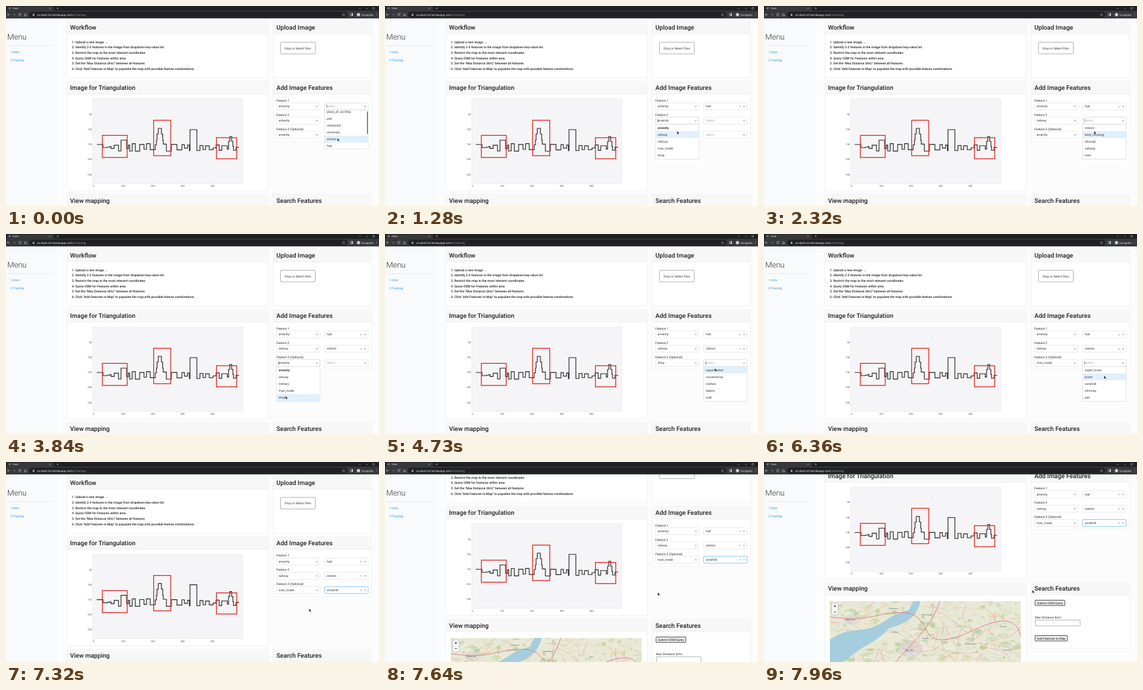
Animation, 600 px wide and 322 px high, one loop 8 s. Source, as an HTML page:

```html
<!DOCTYPE html>
<html lang="en">
<head>
<meta charset="utf-8">
<title>Dash</title>
<style>
  html, body { margin: 0; width: 100%; height: 100%; overflow: hidden; background: #fcfcfc; }
  svg { display: block; width: 100vw; height: 100vh; }
  text { font-family: Roboto, sans-serif; text-rendering: geometricPrecision; white-space: pre; }
</style>
</head>
<body>
<svg viewBox="0 0 600 322" xmlns="http://www.w3.org/2000/svg">
  <rect width="600" height="322" fill="#fcfcfc"/>
  <g id="page"><g id="cards"></g><g id="form"></g></g>
  <g id="frame"></g>
  <path id="cursor" d="M0 0V5.2L1.2 4.1L2.1 6L3 5.6L2.2 3.8H3.8Z" fill="#111" stroke="#fff" stroke-width=".4"/>
</svg>
<script>
const LOOP = 8000, ROW_H = 11.15;
const el = id => document.getElementById(id);

// y is the vertical middle of the line of text
const text = (x, y, s, size = 5, fill = '#2b2b2b', more = '') =>
  `<text x="${x}" y="${y + size * 0.355}" font-size="${size}" fill="${fill}" ${more}>${s}</text>`;
const rect = (x, y, w, h, fill, more = '') =>
  `<rect x="${x}" y="${y}" width="${w}" height="${h}" fill="${fill}" ${more}/>`;
const line = (d, color, width = 0.6) => `<path d="${d}" fill="none" stroke="${color}" stroke-width="${width}"/>`;
const edge = (color, width = 0.5, r = 0) => `stroke="${color}" stroke-width="${width}" rx="${r}"`;
const repeat = (n, draw) => Array.from({ length: n }, (_, i) => draw(i)).join('');

function randomizer(seed) {
  return (a, b) => a + (b - a) * ((seed = seed * 16807 % 2147483647) / 2147483647);
}

function card(x, y, w, h, title) {
  return rect(x, y, w, h, '#fff', edge('#e3e3e3', 0.5, 1)) +
    rect(x, y, w, 20, '#f7f7f7') + line(`M${x} ${y + 20}h${w}`, '#e0e0e0', 0.5) +
    text(x + 5, y + 9.7, title, 10.05, '#212121', 'font-weight="500"');
}

// ---- chart ----
// A rough ground line with a few buildings: [middle, half width, top]
function skyline() {
  const rnd = randomizer(5);
  const buildings = [[189, 4, 216], [247, 5, 216], [247, 4, 206], [247, 2, 197], [301, 5, 199], [361, 3, 218], [361, 1, 210]];
  let d = 'M146 223', ground = 223, stepEnd = 155;
  for (let x = 146; x <= 375; x++) {
    if (x > stepEnd) {
      ground = ground > 227 ? rnd(221, 229) : rnd(228, 234);
      stepEnd = x + rnd(1, 9);
    }
    const tops = buildings.filter(([mid, half]) => Math.abs(x - mid) <= half).map(b => b[2]);
    d += `H${x}V${Math.min(ground, ...tops)}`;
  }
  return line(d, '#222', 1.15);
}

function chart() {
  const box = (x, y, w, h) => rect(x, y, w, h, 'none', edge('#e3201f', 1.3));
  const label = (x, y, s, anchor) =>
    text(x, y, s, 4, '#555', `text-anchor="${anchor}" font-family="Open Sans, sans-serif"`);
  return rect(139.5, 149.5, 241.5, 136.5, '#f5f5f7', edge('#e2e3e8')) +
    repeat(5, i => label(138, 174.5 + i * 24.15, 50 + i * 50, 'end')) +
    repeat(5, i => label(140.5 + i * 47.9, 289.5, i * 100, 'middle')) +
    skyline() + box(155, 208.3, 40, 35.5) + box(237.5, 184, 27.5, 57) + box(338.5, 212, 32.7, 34);
}

// ---- map ----
function map() {
  const X = 106, Y = 333.5, W = 307, H = 140;
  const rnd = randomizer(11), rndX = () => rnd(X, X + W), rndY = () => rnd(Y, Y + H);
  const blob = (x, y, rx, ry, fill) =>
    `<ellipse cx="${x}" cy="${y}" rx="${rx}" ry="${ry}" fill="${fill}" opacity=".7"/>`;
  const road = (color, width, reach) => {
    const angle = rnd(0, 6.28), dx = Math.cos(angle) * reach, dy = Math.sin(angle) * reach;
    const bend = rnd(-0.2, 0.2);
    return line(`M${rndX()} ${rndY()}q${dx / 2 - dy * bend} ${dy / 2 + dx * bend} ${dx} ${dy}`, color, width);
  };
  const name = (x, y, s, size) => text(x, y, s, size, '#444',
    'text-anchor="middle" stroke="#fff" stroke-width=".7" stroke-opacity=".6" paint-order="stroke"');
  const greens = ['#c6d9a8', '#dbe4c4', '#b5cf9b', '#e0dccb'], roads = ['#e0a58a', '#dc8f98', '#e8c987'];
  const towns = ['Chepstow', 'Portishead', 'Yate', 'Stroud', 'Tetbury', 'Dursley', 'Chippenham', 'Thornbury'];
  const land = rect(X, Y, W, H, '#e8e8d6') +
    repeat(320, i => blob(rndX(), rndY(), rnd(1, 8), rnd(1, 4), greens[i % 4])) +
    blob(141, 363, 13, 8, '#d9d0ce') + blob(236, 410, 19, 14, '#d9d0ce');
  const water = `<path d="M240 333H252Q249 350 236 361T201 377Q190 392 154 411L128 431L106 450V396
    Q125 381 150 380T195 365T233 348Z" fill="#a6cddd"/>`;
  const minorRoads = repeat(190, () => road('#fafaf2', 0.4, rnd(8, 40))) +
    repeat(210, i => road(roads[i % 3], 0.5, rnd(8, 45)));
  const motorways = line('M106 359Q150 365 176 358T226 352T262 382T340 379T413 391', '#dd7f91', 1) +
    line('M283 333Q275 360 256 382T222 420T180 462', '#dd7f91', 1);
  return `<clipPath id="mapBox">${rect(X, Y, W, H, '#000')}</clipPath><g clip-path="url(#mapBox)">` +
    land + minorRoads + water + motorways +
    towns.map((s, i) => name(X + 100 + i % 4 * 60 + rnd(-15, 15), Y + 12 + i * 9.5, s, 3.4)).join('') +
    name(139, 363, 'Newport', 4.4) + name(234, 413, 'Bristol', 4.8) + '</g>' +
    rect(109, 337, 10, 18.5, '#fff', edge('#aaa', 0.6, 1.2)) + line('M109 346.2h10', '#ccc', 0.4) +
    line('M112.2 341.6h3.6M114 339.8v3.6M112.2 350.8h3.6', '#111', 0.8);
}

function button(x, y, w, label) {
  return rect(x, y, w, 8.6, '#efefef', edge('#222', 0.8, 0.6)) +
    text(x + w / 2, y + 4.3, label, 5, '#111', 'text-anchor="middle"');
}

const steps = ['Upload a new image →', 'Identify 2-3 features in the image from dropdown key-value list',
  'Restrict the map to the most relevant coordinates', 'Query OSM for Features within area',
  'Set the "Max Distance (Km)" between all features',
  'Click "Add Features to Map" to populate the map with possible feature combinations'];

el('cards').innerHTML =
  card(98, 25, 324, 90.5, 'Workflow') +
  steps.map((s, i) => text(106, 57.8 + i * 8.65, `${i + 1}. ${s}`, 5.1, '#1c1c1c', 'font-weight="500"')).join('') +
  card(430, 25, 158, 90.5, 'Upload Image') +
  rect(441.5, 58.3, 56, 18.7, '#fff', edge('#777', 0.6, 1.6)) +
  text(469.5, 67.8, 'Drop or Select Files', 4.95, '#333', 'text-anchor="middle"') +
  card(98, 122, 324, 175, 'Image for Triangulation') + chart() +
  card(430, 122, 158, 96, 'Add Image Features') +
  card(98, 303.5, 324, 180, 'View mapping') + map() +
  card(430, 303.5, 158, 106, 'Search Features') +
  button(436, 332, 48, 'Submit OSM Query') +
  text(436, 359.5, 'Max Distance (km)', 5) +
  rect(436.3, 364, 72, 9.4, '#fff', edge('#888', 0.6)) +
  button(436, 389, 52, 'Add Features to Map');

// ---- browser bars and side menu, which do not scroll ----
el('frame').innerHTML =
  rect(0, 20, 84, 302, '#f9fafb') +
  text(2, 49.5, 'Menu', 12.6, '#333', 'font-weight="300"') + line('M2 64h73', '#d5d5d5', 0.5) +
  text(7, 74.3, '1-Intro', 5, '#2196f3') + text(7, 87.2, '2-Training', 5, '#2196f3') +
  rect(0, 0, 600, 8, '#1f2023') + rect(2, 0.8, 75, 8, '#37383c', 'rx="2"') + rect(0, 7.5, 600, 12.5, '#37383c') +
  '<circle cx="6" cy="3.7" r="1.4" fill="#8a8fa0"/>' + text(11, 3.7, 'Dash', 4, '#e6e6e6') +
  line('M69.5 2.6l2.2 2.2m0-2.2l-2.2 2.2M81.5 3.7h3.4M83.2 2v3.4', '#ccc', 0.5) +
  line('M567.5 3l1.5 1.5L570.5 3M579 4h3M590 2.4h2.6v2.6h-2.6z', '#ccc', 0.5) +
  rect(37, 9.2, 512, 9.4, '#202124', 'rx="4.7"') +
  line('M5.8 13.9H2.4M4 12.2L2.3 13.9L4 15.6', '#ddd') +
  line('M11.5 13.9h3.4M13.3 12.2l1.7 1.7l-1.7 1.7', '#86878a') +
  line('M24 13a1.9 1.9 0 1 0 .1 1.6M24.3 11.8v1.4h-1.4M29.2 14l2.1-2l2.1 2M29.8 13.6v2.2h3v-2.2', '#ddd') +
  rect(43, 13.4, 2.6, 2.2, '#ccc') + line('M43.6 13.4v-.7a.7.7 0 0 1 1.4 0v.7', '#ccc', 0.4) +
  text(50, 13.9, 'os-dash-int.herokuapp.com<tspan fill="#9a9b9e">/2-training</tspan>', 4.7, '#eee') +
  line('M543 11.9l.7 1.4 1.5.2-1.1 1 .3 1.5-1.4-.7-1.4.7.3-1.5-1.1-1 1.5-.2z', '#ccc', 0.4) +
  rect(554, 12, 3.8, 3.8, 'none', edge('#ddd')) + rect(556, 12, 1.8, 3.8, '#ddd') +
  '<circle cx="567" cy="13.9" r="2.6" fill="#cfd0d3"/>' + text(572, 13.9, 'Incognito', 4.6, '#e8e8e8') +
  repeat(3, i => `<circle cx="596" cy="${12.2 + i * 1.7}" r=".45" fill="#ddd"/>`);

// ---- form ----
const labels = ['Feature 1', 'Feature 2', 'Feature 3 (Optional)'];
const selectX = col => 435 + col * 77.5;
const selectY = row => 156 + row * 23;
const menuTop = row => selectY(row) + 11.3;

// Each menu is open for a while and ends with a pick; pick -1 leaves it without choosing.
const menu = (open, close, row, col, pick, names, scrolled = 0) =>
  ({ open, close, row, col, pick, options: names.split(' '), scrolled });
const keys = 'amenity railway military man_made shop';
const menus = [
  menu(-306, 240, 0, 1, 5, 'place_of_worship pub restaurant university school fuel', 3),
  menu(1120, 1680, 1, 0, 1, keys),
  menu(1900, 2560, 1, 1, 0, 'station level_crossing disused subway tram'),
  menu(3280, 3920, 2, 0, 4, keys),
  menu(4240, 4980, 2, 1, -1, 'supermarket convenience clothes bakery mall'),
  menu(5140, 5790, 2, 0, 3, keys),
  menu(6120, 6920, 2, 1, 2, 'water_tower tower windmill chimney pier')
];

// The pointer opens a menu at its arrow, swings a little past the option and settles on it.
const rest = (from, to, x, y) => ({ from, to, start: [x, y], end: [x, y], swing: 0 });
const stops = menus.map(m => ({
  from: m.open, to: m.close, swing: 14,
  start: [selectX(m.col) + 60, selectY(m.row) + 5.7],
  end: [selectX(m.col) + 16, menuTop(m.row) - m.scrolled + (m.pick + 0.5) * ROW_H]
})).concat(rest(7160, 7330, 489, 238.5), rest(7960, LOOP, 433, 208.5));

const progress = (t, from, to) => Math.min(1, Math.max(0, (t - from) / (to - from)));
const easeOut = (p, power) => 1 - (1 - p) ** power;
const mix = (a, b, p) => a + (b - a) * p;

function pointerAt(t) {
  const i = stops.findLastIndex(s => s.from <= t), { from, to, start, end, swing } = stops[i];
  if (t < to) {
    const p = progress(t, from, to - 60);
    return [mix(start[0], end[0], easeOut(p, 2)), mix(start[1], end[1], p) + swing * Math.sin(Math.PI * p)];
  }
  const next = stops[i + 1], p = easeOut(progress(t, to, next.from), 3);
  return [mix(end[0], next.start[0], p), mix(end[1], next.start[1], p)];
}

// Wheel scrolling, redrawn every 80 ms
function scrollAt(t) {
  const stepped = Math.floor((t - 40) / 80) * 80 + 40;
  return 58.1 * (1 - Math.cos(Math.max(0, stepped - 7264) / 262));
}

function select(row, col, value, open, focused) {
  const x = selectX(col), y = selectY(row), mid = y + 5.7, up = open ? -1 : 1;
  return rect(x, y, 70, 11.2, '#fff', edge(focused ? '#58b0e6' : open ? '#bbb' : '#d2d2d2', focused ? 0.7 : 0.5, 1.2)) +
    text(x + 3.5, mid, value || 'Select...', 5, value ? '#333' : '#aaa') +
    (open ? line(`M${x + 3.4} ${mid - 3}v6`, '#222', 0.5) : '') +
    (col && value ? text(x + 58.8, mid, '×', 5.4, '#888', 'text-anchor="middle"') : '') +
    `<path d="M${x + 63.4} ${mid - 0.7 * up}h3.2l-1.6 ${1.7 * up}z" fill="#888"/>`;
}

function menuList({ row, col, options, scrolled }, value, pointerY) {
  const x = selectX(col), top = menuTop(row), height = Math.min(options.length * ROW_H + 0.4, 62.7);
  const start = top - scrolled;
  const hover = pointerY > top ? Math.min(options.length - 1, Math.floor((pointerY - start) / ROW_H))
    : Math.max(0, options.indexOf(value));
  const list = options.map((name, i) => text(x + 3.5, start + (i + 0.5) * ROW_H, name, 5, '#333',
    name === value ? 'font-weight="700"' : '')).join('');
  return rect(x, top, 70, height, '#fff', edge('#ccc')) +
    `<clipPath id="menuBox">${rect(x, top, 70, height, '#000')}</clipPath><g clip-path="url(#menuBox)">` +
    rect(x, start + hover * ROW_H, 70, ROW_H, '#e1f0fb') + list + '</g>' +
    (scrolled ? rect(x + 68.3, top + 2.5, 1.3, 36, '#555', 'rx=".6"') : '');
}

function form(t, pointerY) {
  const values = labels.map(() => ['amenity', '']);
  const chosen = menus.filter(m => m.close <= t && m.pick >= 0);
  for (const m of chosen) values[m.row][m.col] = m.options[m.pick];
  const last = chosen[chosen.length - 1];
  const current = menus.find(m => m.open <= t && t < m.close);
  const at = (m, row, col) => !!m && m.row === row && m.col === col;
  const rows = labels.map((label, row) => text(435, selectY(row) - 4, label, 4.95, '#222') +
    repeat(2, col => select(row, col, values[row][col], at(current, row, col), !current && at(last, row, col))));
  return rows.join('') + (current ? menuList(current, values[current.row][current.col], pointerY) : '');
}

function draw(now) {
  const t = now % LOOP, [x, y] = pointerAt(t);
  el('page').setAttribute('transform', `translate(0 ${-scrollAt(t)})`);
  el('form').innerHTML = form(t, y - 2);
  el('cursor').setAttribute('transform', `translate(${x - 1.5} ${y - 2.5})`);
  requestAnimationFrame(draw);
}
draw(0);
</script>
</body>
</html>
```
